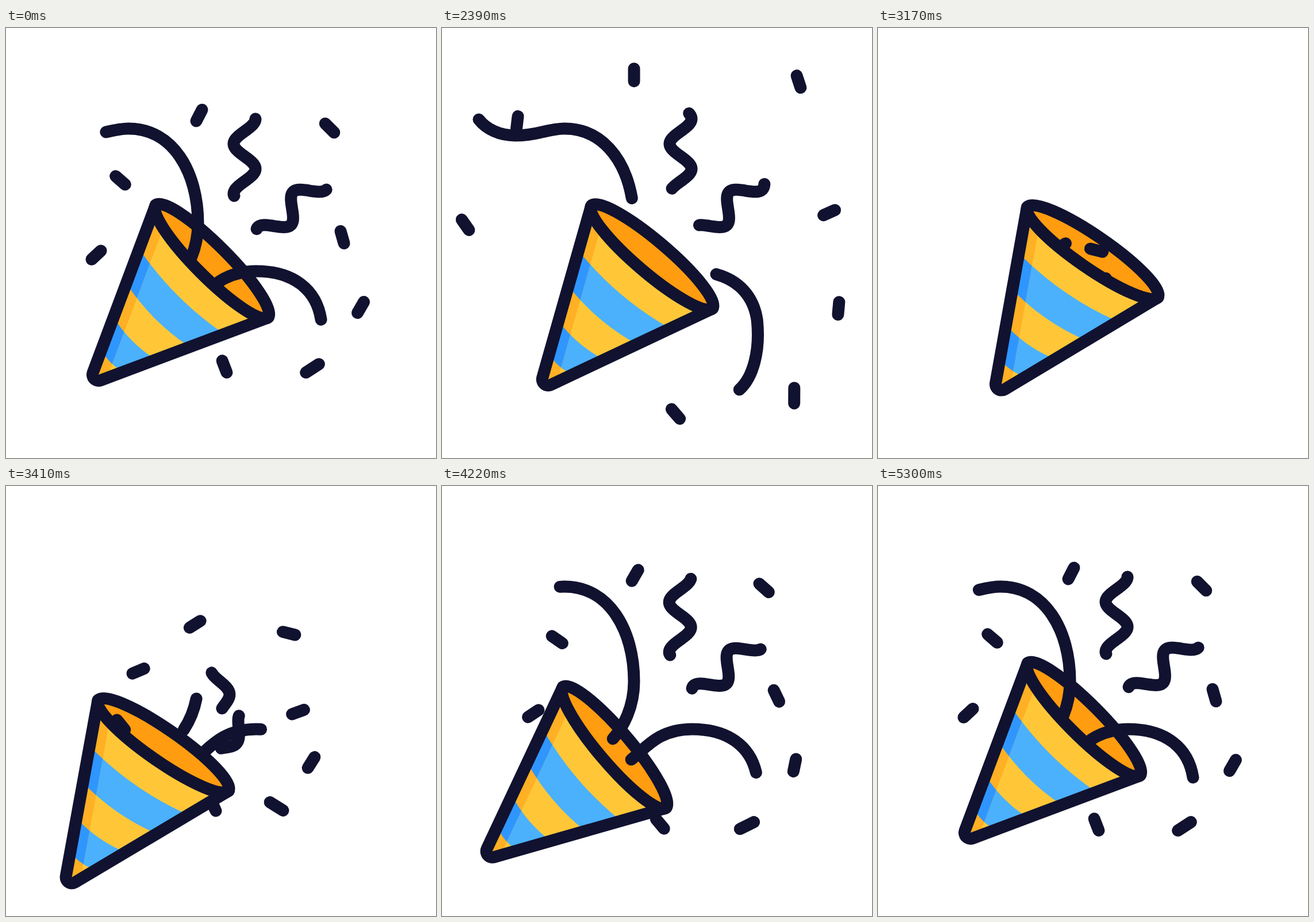
These frames come from a looping animation (748 px wide and 748 px high, 5.36 s). An HTML page:

```html
<!DOCTYPE html>
<html lang="en">
<head>
<meta charset="utf-8">
<title>Party popper</title>
<style>
  html, body { margin: 0; width: 100%; height: 100%; overflow: hidden; background: #fff; }
  svg { display: block; width: 100vw; height: 100vh; }
  .ink { fill: none; stroke: #11122f; stroke-width: 21; stroke-linecap: round; stroke-linejoin: round; }
</style>
</head>
<body>
<svg viewBox="0 0 748 748">
  <defs>
    <path id="body" d="M-9.55 4.35L-138.4 -279A138.4 28 0 0 0 138.4 -279L9.55 4.35A10.5 10.5 0 0 1 -9.55 4.35Z"/>
    <path id="bands"/>
    <clipPath id="inBody"><use href="#body"/></clipPath>
    <clipPath id="inShade"><path d="M31 30L-118 -298H-180L-40 30Z"/></clipPath>
  </defs>
  <g class="cone"><ellipse cy="-279" rx="138" ry="28" fill="#ff9c10"/></g>
  <g id="party" class="ink"></g>
  <g class="cone">
    <g clip-path="url(#inBody)">
      <use href="#body" fill="#ffc738"/>
      <use href="#bands" fill="#4bb1fc"/>
      <g clip-path="url(#inShade)">
        <use href="#body" fill="#ffb024"/>
        <use href="#bands" fill="#2f96ff"/>
      </g>
    </g>
    <ellipse class="ink" cy="-279" rx="138" ry="28"/>
    <path class="ink" d="M-138.4 -279L-9.55 4.35A10.5 10.5 0 0 0 9.55 4.35L138.4 -279"/>
  </g>
</svg>
<script>
const LOOP = 5360, START = 2030, BURST = 3110, END = 5300, STEP = 30;
const party = document.getElementById('party');
const cones = document.querySelectorAll('.cone');

const clamp = v => Math.max(0, Math.min(1, v));
const mix = (a, b, k) => a + (b - a) * k;
const smooth = u => u * u * (3 - 2 * u);
const easeOut = u => 1 - (1 - u) ** 2;
const tween = (t, from, to, ease = smooth) => ease(clamp((t - from) / (to - from)));
const decay = (t, from, tau) => Math.min(1, Math.exp((from - t) / tau));
const flight = t => clamp((t - START) / (BURST - START));

function addPath(d = '') {
  const el = document.createElementNS('http://www.w3.org/2000/svg', 'path');
  el.setAttribute('d', d);
  return party.appendChild(el);
}

function trim(el, from, to) {
  const len = to - from;
  el.style.display = len < 1 ? 'none' : '';
  el.style.strokeDasharray = `${Math.max(len, 0)} 3000`;
  el.style.strokeDashoffset = -from;
}

// Blue stripe between two distances from the tip
function band(far, near) {
  const x = 0.46, y = -0.918, bend = -0.832;
  return `M${-x * far} ${y * far}Q0 ${bend * far} ${x * far} ${y * far}`
    + `L${x * near} ${y * near}Q0 ${bend * near} ${-x * near} ${y * near}Z`;
}
document.getElementById('bands').setAttribute('d', band(222.5, 158.2) + band(94.9, 34.2));

// The cone turns about a pivot that leans in, recoils and returns.
const PIVOT = 200, REST = [302.4, 461.6], AIM = [328.5, 455], KICK = [203, 532];

function poseCone(t) {
  const aim = tween(t, START, 2800);
  const kick = tween(t, 3180, 3600, easeOut);
  const back = tween(t, 3600, 5100);
  const [x, y] = REST.map((r, i) => mix(mix(mix(r, AIM[i], aim), KICK[i], kick), r, back));
  const turn = 45 - 10.4 * aim + 16.4 * tween(t, 3380, 3870) - 6 * tween(t, 3890, 4950);
  for (const cone of cones)
    cone.setAttribute('transform', `translate(${x} ${y}) rotate(${turn}) translate(0 ${PIVOT})`);
}

// Long streamer: grows to the end of `inner`, later slides off along `outer`.
function streamer(inner, outer, gone, born, tau) {
  const el = addPath(inner), rest = el.getTotalLength();
  el.setAttribute('d', inner + outer);
  const total = el.getTotalLength();
  return t => t < BURST
    ? trim(el, total * tween(t, START, gone), mix(rest, total, tween(t, START, 2700)))
    : trim(el, 90 * decay(t, BURST, 200), rest * (1 - decay(t, born, tau)));
}

// Short ribbon: a wave whose ends slide between heights
const TOP = 112, BOTTOM = 410, HEAD = 158, TAIL = 292;
const waveX = y => 415 + (19 - 0.15 * Math.max(0, y - 290)) * Math.cos((y - HEAD) / 87 * 2 * Math.PI);
const waveLength = [0];
let wave = `M${waveX(TOP)} ${TOP}`;
for (let y = TOP + 1; y <= BOTTOM; y++) {
  wave += `L${waveX(y).toFixed(2)} ${y}`;
  waveLength.push(waveLength.at(-1) + Math.hypot(1, waveX(y) - waveX(y - 1)));
}
function lengthTo(y) {
  const d = Math.max(0, Math.min(BOTTOM - TOP - 1, y - TOP)), i = Math.floor(d);
  return mix(waveLength[i], waveLength[i + 1], d - i);
}

function ribbon(place, dx, dy) {
  const el = addPath(wave);
  return t => {
    const u = flight(t), back = t < BURST ? 0 : decay(t, 3090, 210);
    const head = t < BURST ? mix(HEAD, 114, u ** 1.4) : HEAD + 615 * back;
    const tail = t < BURST ? mix(TAIL, 114, u ** 2.4) : TAIL + 284 * back;
    el.setAttribute('transform', `translate(${dx * back} ${dy * back}) ${place}`);
    trim(el, lengthTo(head), lengthTo(tail));
  };
}

// Confetti: shot out of the cone to a resting place, later flung on outwards
const MUZZLE = [310, 468], CENTER = [345, 480];

function confetto(x, y, angle, spin, fling, size = 22) {
  const el = addPath();
  const heading = Math.atan2(y - CENTER[1], x - CENTER[0]);
  return t => {
    let px, py, turn, len = size;
    if (t < BURST) {
      const out = 1.067 * (1 - (1 - flight(t) ** 1.25) ** 3);
      px = x + fling * out * Math.cos(heading);
      py = y + fling * out * Math.sin(heading);
      turn = angle - 1.4 * spin * out;
      len *= clamp((BURST - t) / 100);
    } else {
      const left = decay(t, 3088, 253);
      px = mix(x, MUZZLE[0], left);
      py = mix(y, MUZZLE[1], left);
      turn = angle + spin * clamp((4600 - t) / 1190) ** 2;
    }
    el.setAttribute('d', `M${-len / 2} 0H${len / 2}`);
    el.setAttribute('transform', `translate(${px} ${py}) rotate(${turn})`);
  };
}

const parts = [
  poseCone,
  streamer('M297 440C315 420 334 385 334 340C334 250 290 175 213 175C200 175 187 178 174 181',
    'C158 185 145 187 127 187C85 187 53 160 53 128C53 108 63 89 80 76', BURST, 3325, 362),
  streamer('M329 476C353 458 375 423 435 423C500 423 540 455 548 507',
    'C556 580 530 641 487 641C455 641 438 632 436 606', 2980, 3227, 288),
  ribbon('', -179, 151),
  ribbon('translate(124 121) rotate(45 431 158)', -142, 230),
  confetto(336, 152, 117, 31, 113),
  confetto(563, 174, 45, -31, 159),
  confetto(585, 364, 74, -94, 158),
  confetto(617, 486, 120, -178, 117),
  confetto(533, 592, -33, 65, 149, 27),
  confetto(380, 589, 69, -184, 139),
  confetto(199, 265, 41, -64, 195),
  confetto(157, 395, -43, 94, 205)
];

function draw(now) {
  const t = Math.max(START, Math.min(END, now % LOOP));
  const step = START + Math.floor((t - START) / STEP) * STEP;
  parts.forEach(part => part(step));
  requestAnimationFrame(draw);
}
draw(performance.now());
</script>
</body>
</html>
```
